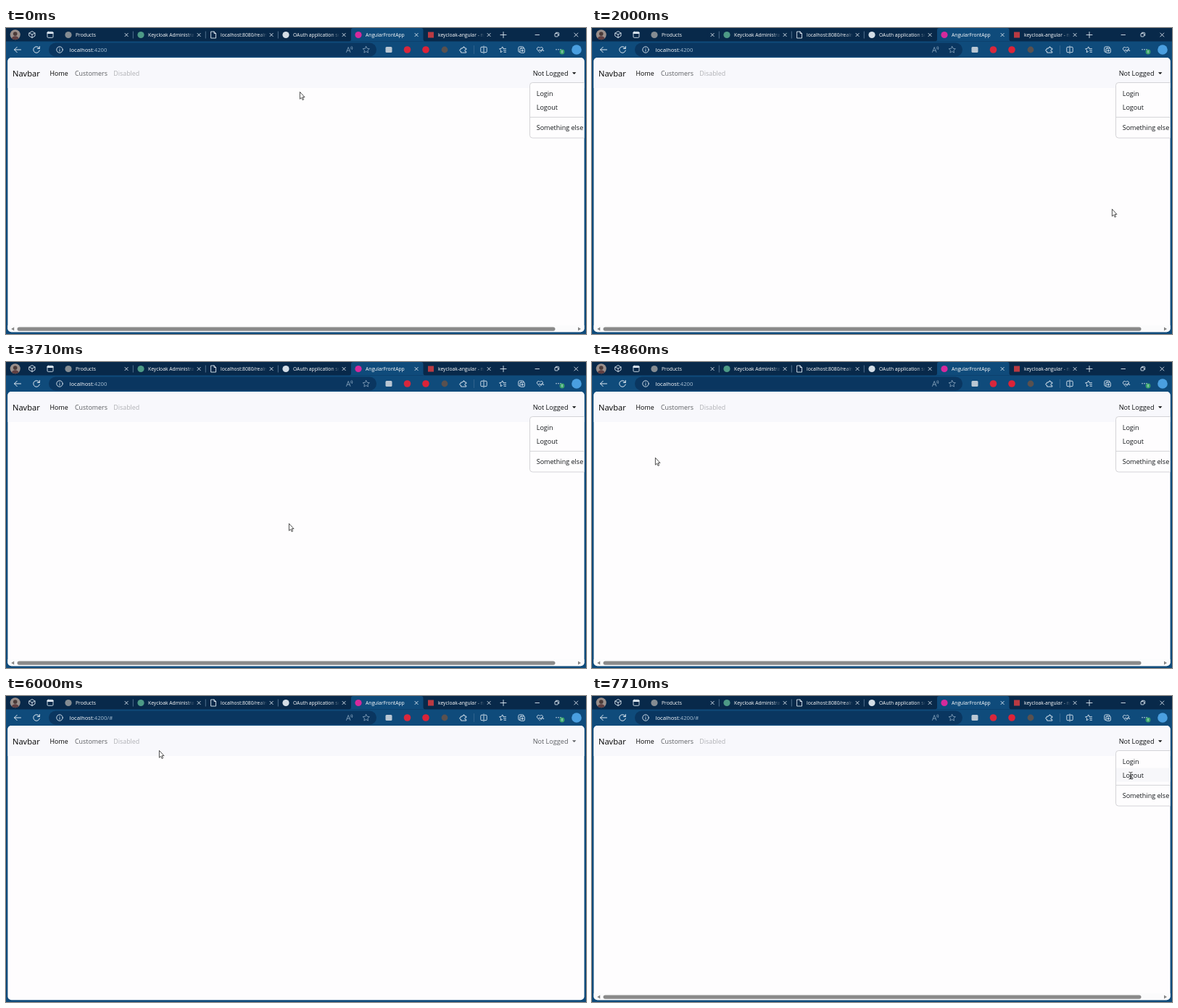
Animation, 800 px wide and 423 px high, one loop 8000 ms. Source, as an HTML page:

```html
<!DOCTYPE html>
<html lang="en">
<head>
<meta charset="utf-8">
<style>
  html, body { margin: 0; width: 100%; height: 100%; overflow: hidden; background: #0f4b7b; }
  svg { display: block; width: 800px; height: 423px; }
  text { font-family: "Open Sans", "Noto Sans", sans-serif; white-space: pre; }
  .line { fill: none; stroke: #dfe9f2; stroke-width: .9; stroke-linecap: round; stroke-linejoin: round; }
  .dim { stroke: #8ba6bf; stroke-width: .8; }
  .tab { font-size: 6.75px; fill: #fff; }
  .url { font-size: 7.7px; fill: #fff; }
  .nav { font-size: 8.9px; }
  .item { font-size: 9.05px; fill: #15181b; }
</style>
</head>
<body>
<svg viewBox="0 0 800 423">
  <defs>
    <linearGradient id="fade"><stop stop-color="#08294a" stop-opacity="0"/><stop offset="1" stop-color="#08294a"/></linearGradient>
    <clipPath id="page"><rect x="2.4" y="41" width="795.2" height="379.2" rx="5"/></clipPath>
    <clipPath id="face"><circle cx="12.7" cy="9.3" r="7"/></clipPath>
  </defs>

  <rect width="800" height="423" fill="#0f4b7b"/>
  <rect width="800" height="18.5" fill="#08294a"/>
  <g id="tabs"></g>

  <g clip-path="url(#face)">
    <rect x="5" y="2" width="16" height="16" fill="#9a8f8b"/>
    <circle cx="12.7" cy="8" r="2.8" fill="#4b3b39"/>
    <ellipse cx="12.7" cy="15.5" rx="5" ry="4.2" fill="#5f3f42"/>
  </g>
  <g class="line">
    <path d="M32 7l4-2.5 4 2.5v4l-4 2.5-4-2.5zM32 7l4 2 4-2M36 9v4.5"/>
    <rect x="57" y="5.3" width="8" height="8" rx="1.2"/>
    <path d="M57.5 6.8H64.5" stroke-width="2.2"/>
    <path d="M686 5.5v8M682 9.5h8"/>
    <path d="M730 9.5h5.5M783.8 7l5 5m0-5l-5 5"/>
    <rect x="757" y="7.6" width="4.3" height="4.3" rx=".8"/>
    <path d="M758.5 6.3h3q1.2 0 1.2 1.2v3"/>
  </g>

  <rect x="59" y="20.5" width="452" height="19" rx="9.5" fill="#0a3660"/>
  <text class="url" x="87.5" y="33">localhost<tspan fill="#a9bfd2">:4200</tspan><tspan id="hash" fill="#a9bfd2">/#</tspan></text>
  <g class="line">
    <path d="M20.5 30h-9m3.7-3.7L11.5 30l3.7 3.7" stroke-width="1"/>
    <path d="M46 28.2A4.3 4.3 0 1 0 46.3 31M46.3 25.5v3h-3" stroke-width="1"/>
    <circle cx="74" cy="30" r="4.2"/><path d="M74 29.8v2.3M74 28v.1"/>
    <path class="dim" d="M469.5 33.5l2.7-7 2.7 7m-4.5-2.3h3.6M475.5 26.5q1.3 1 .3 2.5M477 25.5q1.8 2 .4 4.2"/>
    <path d="M631.5 26.2a1.4 1.4 0 0 1 1.3 1.8h2v2a1.4 1.4 0 1 0 0 2.6v1.5h-7.2v-2a1.4 1.4 0 1 1 0-2.7V28h2.5a1.4 1.4 0 0 1 1.4-1.8z"/>
    <path d="M645.5 24.5v11" stroke="#426f96" stroke-width=".7"/>
    <path d="M658 26.3h-2q-1.2 0-1.2 1.2v5q0 1.2 1.2 1.2h2M660 26.3h2q1.2 0 1.2 1.2v5q0 1.2-1.2 1.2h-2M659 25v10"/>
    <path d="M686 28.7h3.5M686.5 31h3M687 33.3h2.5"/>
    <path d="M708.5 33.5q-1.7 0-1.7-1.7v-4.2q0-1.7 1.7-1.7h4q1.7 0 1.7 1.7"/>
    <rect x="709" y="28" width="6.3" height="6.3" rx="1.3"/><path d="M712.2 29.7v3M710.7 31.2h3"/>
    <path d="M736.5 33.8l-3.7-3.6c-1.6-2.2 1.5-5.3 3.7-2.6 2.2-2.7 5.3.4 3.7 2.6M735 30.5h2l1 2 1.3-3 1 1.8h1.5"/>
    <path d="M759 29.8h.1M762 29.8h.1M765 29.8h.1" stroke-width="1.4"/>
  </g>
  <g id="stars" class="line"></g>
  <circle cx="767" cy="33" r="3.4" fill="#3aa46b"/><path class="line" d="M767 31.3v3" stroke-width=".8"/>
  <circle cx="787" cy="30" r="6.8" fill="#4a9fe0"/>
  <rect x="523.5" y="26" width="9" height="8" rx="1.5" fill="#b9c7d3"/>
  <circle cx="553.5" cy="30" r="4.8" fill="#d8273c"/>
  <circle cx="579" cy="30" r="4.8" fill="#dc2338"/>
  <circle cx="605" cy="30" r="4.4" fill="#59514f"/>

  <g clip-path="url(#page)">
    <rect y="41" width="800" height="380" fill="#fefdfe"/>
    <rect y="41" width="800" height="42" fill="#f8f8fc"/>
    <text x="9" y="67" font-size="11.15">Navbar</text>
    <g class="nav">
      <text x="60.5" y="66">Home</text>
      <text x="95" y="66" fill="#5c5e62">Customers</text>
      <text x="148.3" y="66" fill="#b0b1b5">Disabled</text>
      <g id="toggle"><text x="726.7" y="66" font-size="9.1">Not Logged</text><path d="M781 61.2h5.4l-2.7 2.9z"/></g>
    </g>
    <g id="menu">
      <rect x="722.5" y="75.5" width="96" height="76.5" rx="3.8" fill="#fefdfe" stroke="#d0d0d3" stroke-width=".9"/>
      <rect id="hover" x="723" width="76" height="19" fill="#f7f7fa"/>
      <path d="M723 123.3h76" stroke="#d0d0d3" stroke-width=".9"/>
      <text class="item" x="731.7" y="93.7">Login</text>
      <text class="item" x="731.7" y="112.7">Logout</text>
      <text class="item" x="731.7" y="141">Something else</text>
      <rect y="411" width="800" height="10" fill="#fbfbfc"/>
      <rect x="15.5" y="413.4" width="742" height="5.4" rx="2.7" fill="#8a8a8a"/>
      <path d="M11.2 413.4v5.2l-4-2.6zM789 413.4v5.2l4-2.6z" fill="#858585"/>
    </g>
  </g>

  <g id="pointer" fill="#fff" stroke="#222" stroke-width=".8" stroke-linejoin="round">
    <path id="arrow" d="M.4.4V10.2L2.6 8.2 4.1 11.5 5.6 10.8 4.1 7.6H7z"/>
    <path id="hand" d="M-1.5 3.5V-2.3q0-1 .9-1t.9 1V1.5q1.4-.7 1.7.4 1.4-.6 1.7.5 1.5-.5 1.6.7V6.8Q5.3 9.5 4 11H-.2Q-2.5 8.3-4 5.6q-.3-1.6 1.2-1.2z"/>
    <path id="beam" d="M-2.5-4.8Q0-4.8 0-3.6 0-4.8 2.5-4.8M0-3.8V3.8M-2.5 4.8Q0 4.8 0 3.6 0 4.8 2.5 4.8M-1.2 1h2.4" fill="none"/>
  </g>
</svg>
<script>
const LOOP = 8000;
const $ = id => document.getElementById(id);
const show = (id, on) => $(id).setAttribute("display", on ? "inline" : "none");

const icon = {
  dot: (x, color) => `<circle cx="${x}" cy="9.5" r="4.6" fill="${color}"/>`,
  box: (x, color) => `<rect x="${x - 4}" y="5.5" width="8" height="8" fill="${color}"/>`,
  doc: x => `<path class="line" d="M${x - 3} 5h4l2.5 2.5v6.5h-6.5zM${x + 1} 5v2.5h2.5"/>`
};
const tabs = [
  ["Products", "dot", "#858c92"],
  ["Keycloak Administrat", "dot", "#4d9a86"],
  ["localhost:8080/realms", "doc"],
  ["OAuth application set", "dot", "#d3dde6"],
  ["AngularFrontApp", "dot", "#d52a9c"],
  ["keycloak-angular - np", "box", "#b93a42"]
];
const ACTIVE = 4;

$("tabs").innerHTML = `<path d="M473 18.5q3 0 3-3V3q0-3 3-3h93.5q3 0 3 3v12.5q0 3 3 3z" fill="#0f4b7b"/>` +
  tabs.map(([title, shape, color], i) => {
    const x = 76 + 100 * i;
    const cover = i === ACTIVE ? "" :
      `<rect x="${x + 72}" y="3" width="12" height="14" fill="url(#fade)"/>
       <rect x="${x + 83.5}" y="3" width="16" height="14" fill="#08294a"/>`;
    const edge = i < 3 ? `<path d="M${x + 99.3} 4.5v10" stroke="#6483a0" stroke-width=".8"/>` : "";
    return icon[shape](x + 10, color) +
      `<text class="tab" x="${x + 20}" y="12">${title}</text>${cover}${edge}
       <path class="line" d="M${x + 88} 7.4l4.2 4.2m0-4.2l-4.2 4.2"/>`;
  }).join("");

function starPath(cx, cy) {
  const points = Array.from({ length: 10 }, (_, k) => {
    const r = k % 2 ? 2.3 : 4.8, a = k * Math.PI / 5 - Math.PI / 2;
    return `${(cx + r * Math.cos(a)).toFixed(1)} ${(cy + r * Math.sin(a)).toFixed(1)}`;
  });
  return `<path class="dim" d="M${points.join("L")}z"/>`;
}
$("stars").innerHTML = starPath(496.7, 30.2) +
  `<path d="M686 28.3l-1.3-2.4-1.3 2.4-2.8.5 2 2-.4 2.9 2.2-1.2"/>`;

// Pointer stops: time, x, y.
const stops = [
  [0, 405, 88], [140, 722, 247], [1000, 719, 248], [2000, 717, 250],
  [2430, 714, 252], [2570, 711, 253], [2710, 708, 253], [3000, 707, 253],
  [3290, 688, 251], [3430, 630, 246], [3570, 530, 237], [3710, 390, 223],
  [4290, 96, 138], [4860, 87, 132], [5000, 83, 108], [5140, 78, 78],
  [5290, 75, 63], [5570, 82, 63], [5710, 118, 66], [5860, 165, 71],
  [6000, 211, 75], [6140, 330, 89], [6290, 490, 96], [6430, 665, 86], [6570, 778, 64],
  [6860, 781, 62], [7000, 776, 68], [7140, 768, 79], [7290, 757, 90],
  [7430, 749, 99], [7570, 744, 107], [7710, 743, 110]
];
const CLOSE = 5430, OPEN = 6860;
const inside = (x, y, left, top, right, bottom) => x >= left && x < right && y >= top && y < bottom;

function render(t) {
  const [, x, y] = stops.findLast(stop => stop[0] <= t);
  const open = t < CLOSE || t >= OPEN;
  const overToggle = inside(x, y, 722, 52, 791, 75);
  const overLink = overToggle || inside(x, y, 56, 52, 144, 75);
  const overItem = open && inside(x, y, 723, 80, 798, 118.5);
  const kind = overLink ? "hand" : overItem ? "beam" : "arrow";

  show("menu", open);
  show("hash", t >= CLOSE);
  show("hover", overItem);
  $("hover").setAttribute("y", y < 99.5 ? 80.5 : 99.5);
  $("toggle").setAttribute("fill", open ? "#0c0e10" : overToggle ? "#3b3d40" : "#5c5e62");
  for (const id of ["arrow", "hand", "beam"]) show(id, id === kind);
  $("pointer").setAttribute("transform", `translate(${x} ${y})`);
}

const start = performance.now();
function tick() {
  render((performance.now() - start) % LOOP);
  requestAnimationFrame(tick);
}
tick();
</script>
</body>
</html>
```
